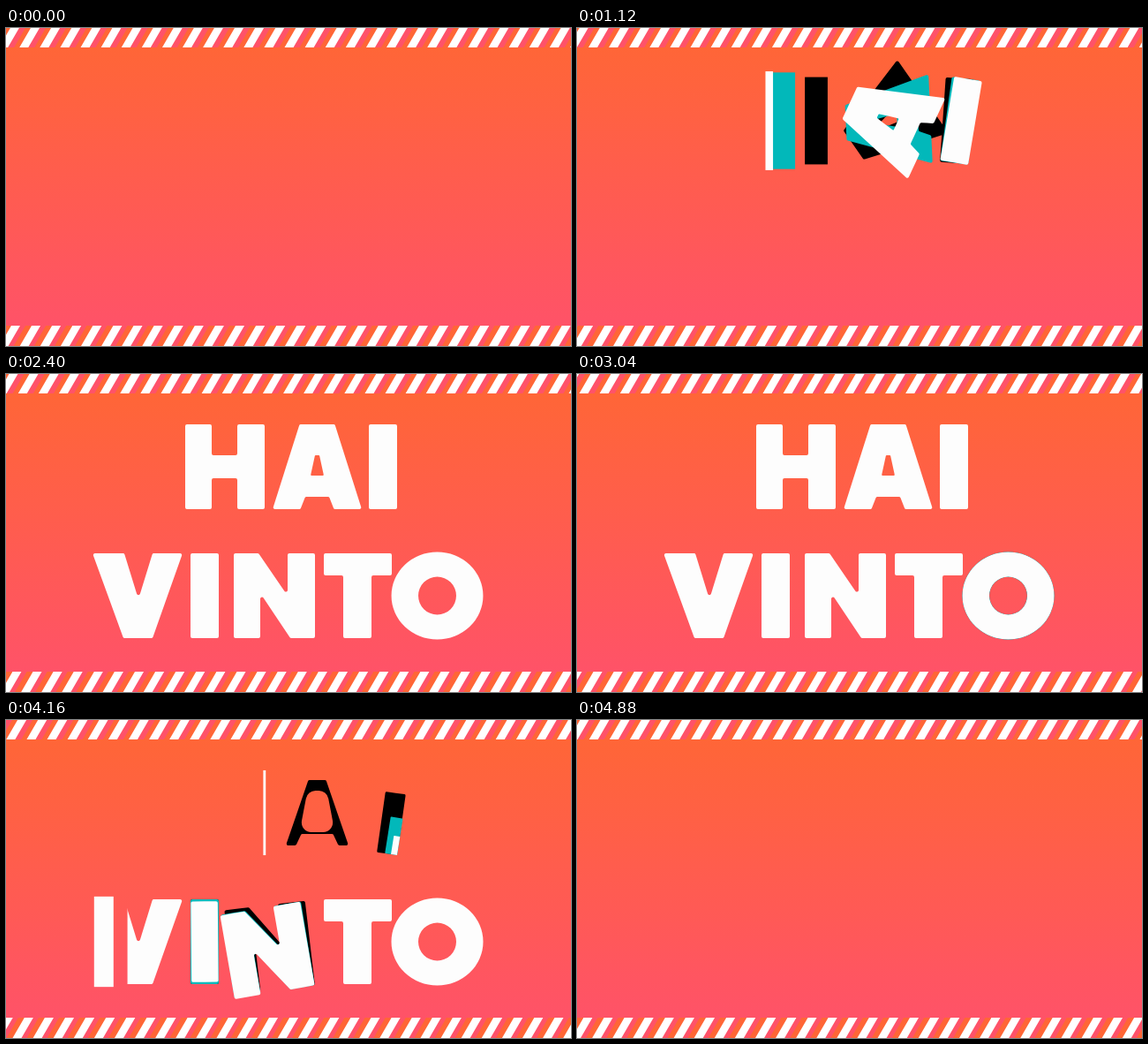
Animation of 640x360 px, one loop 4.96 s. Source, as an HTML page with a canvas:

```html
<!DOCTYPE html>
<html lang="it">
<head>
<meta charset="utf-8">
<title>Hai vinto</title>
<style>
  html, body { margin: 0; width: 100%; height: 100%; overflow: hidden; background: #ff5c50; }
  canvas { display: block; width: 640px; height: 360px; }
</style>
</head>
<body>
<canvas id="stage" width="640" height="360" role="img" aria-label="HAI VINTO"></canvas>
<script>
const ctx = document.getElementById('stage').getContext('2d');
const LOOP = 4960, STEP = 80, MIDDLE = 3000;
const ORANGE = '#ff6636', PINK = '#ff5269';
// Back to front: each layer repeats the motion of the white one, a little later.
const LAYERS = [
  { color: '#000', lag: 160 },
  { color: '#02b8ba', lag: 80 },
  { color: '#fdfdfd', lag: 0 }
];

const { sin, cos, exp, abs, sqrt, PI } = Math;
const clamp = v => Math.max(0, Math.min(1, v));
const lerp = (a, b, p) => a + (b - a) * p;
const progress = (t, start, span) => clamp((t - start) / span);
const fadeOut = p => (1 - p) ** 2;
const bump = (p, from, to) => sin(PI * clamp((p - from) / (to - from)));

function addPoly(path, pts, r) {
  const mid = (a, b) => [(a[0] + b[0]) / 2, (a[1] + b[1]) / 2];
  path.moveTo(...mid(pts[pts.length - 1], pts[0]));
  pts.forEach((p, i) => {
    const end = mid(p, pts[(i + 1) % pts.length]);
    path.arcTo(...p, ...end, r);
    path.lineTo(...end);
  });
  path.closePath();
}
function poly(pts, r = 2) {
  const path = new Path2D();
  addPoly(path, pts, r);
  return path;
}
const stem = (x, y) => poly([[x, y], [x + 32, y], [x + 32, y + 96], [x, y + 96]]);

const shapeH = poly([[203, 57], [233, 57], [233, 92], [262, 92], [262, 57], [293, 57],
  [293, 153], [262, 153], [262, 118], [233, 118], [233, 153], [203, 153]]);
const shapeV = poly([[98, 203], [134, 203], [150, 255], [166, 203], [200, 203], [166, 299], [133, 299]]);
const shapeN = poly([[258, 203], [286, 203], [319, 251], [319, 203], [350, 203],
  [350, 299], [322, 299], [288, 248], [288, 299], [258, 299]]);
const shapeT = poly([[360, 203], [437, 203], [437, 228], [414, 228], [414, 299],
  [382, 299], [382, 228], [360, 228]]);
const shapeO = new Path2D();
shapeO.ellipse(488.5, 251, 52, 49.5, 0, 0, 2 * PI);
shapeO.moveTo(510, 251);
shapeO.arc(488.5, 251, 21.5, 0, 2 * PI);

// The A can thin out: half-widths and heights blend from bold to light around its axis.
function shapeA(thin) {
  const mix = (bold, light) => lerp(bold, light, thin);
  const mirror = half => [...half.map(([x, y]) => [352.5 + x, y]),
    ...half.reverse().map(([x, y]) => [352.5 - x, y])];
  const foot = mix(153, 142);
  const path = poly(mirror([[mix(20, 10), mix(57, 68)], [mix(50.5, 35.5), foot],
    [mix(19, 24), foot], [mix(13.5, 18), mix(139, 129)]]));
  addPoly(path, mirror([[mix(2.5, 11), mix(92, 80)], [mix(7.5, 20), mix(115, 127)]]), mix(1, 11));
  return path;
}

const swing = deg => ({ deg, dx: .8 * deg, dy: abs(deg) });

// Each letter enters and leaves by a rule of its own progress p.
const letters = [
  { shape: shapeA, pivot: [352.5, 105], enterAt: 845, enterFor: 690, leaveAt: 3760, leaveFor: 300,
    enter: p => ({ scale: clamp(p * 6), deg: -180 * fadeOut(p) }),
    leave: p => ({ scale: clamp((1 - p) * 5), thin: clamp(p / .8) }) },
  { shape: stem(411, 57), pivot: [443, 153], enterAt: 900, enterFor: 440, leaveAt: 3937, leaveFor: 421,
    enter: p => ({ scale: clamp(p * 8), deg: 9.5 * sin(PI * p), dy: 2 * sin(PI * p) }),
    leave: p => ({ scale: fadeOut(p), deg: 9 * clamp(p * 6) }) },
  { shape: stem(209, 203), pivot: [225, 251], enterAt: 1480, enterFor: 520, leaveAt: 4150, leaveFor: 400,
    enter: p => ({ scale: clamp(p * 5), deg: -24 * fadeOut(p),
      sx: 1 - .5 * bump(p, .4, .7), sy: 1 - .15 * bump(p, .4, .7) }),
    leave: p => ({ scale: fadeOut(p), deg: -20 * p }) },
  { shape: shapeN, pivot: [304, 251], enterAt: 1460, enterFor: 560, leaveAt: 3880, leaveFor: 640,
    enter: p => ({ scale: clamp(p * 5), ...swing(9 * sin(PI * p)) }),
    leave: p => ({ scale: 1 - clamp((p - .45) / .55) ** 2, ...swing(-10 * sin(1.25 * PI * p)) }) },
  { shape: shapeT, pivot: [398.5, 251], enterAt: 1690, enterFor: 300, leaveAt: 4220, leaveFor: 380,
    enter: p => ({ scale: clamp(p * 9), deg: -120 * fadeOut(p), dx: 15 * (1 - p),
      sx: lerp(.84, 1, p), sy: lerp(.5, 1, p) }),
    leave: p => ({ scale: 1 - p * p, deg: -120 * p * p }) },
  { shape: shapeO, pivot: [488.5, 251], enterAt: 1520, enterFor: 480, leaveAt: 4290, leaveFor: 320,
    enter: p => ({ scale: 1 - exp(-7.6 * p) * cos(6 * PI * p) }),
    leave: p => ({ scale: 1 - p * p }) }
];

function poseAt(letter, t) {
  const pose = t < MIDDLE
    ? letter.enter(progress(t, letter.enterAt, letter.enterFor))
    : letter.leave(progress(t, letter.leaveAt, letter.leaveFor));
  const { scale, deg = 0, dx = 0, dy = 0, sx = 1, sy = 1, thin = 0 } = pose;
  return [scale * sx, scale * sy, deg, dx, dy, thin].map(v => Math.round(v * 1000) / 1000);
}

function drawLetter(letter, t, lag) {
  const pose = poseAt(letter, t - lag);
  if (pose[0] < .01 || (lag && String(pose) === String(poseAt(letter, t)))) return;
  const [sx, sy, deg, dx, dy, thin] = pose;
  const { shape, pivot: [px, py] } = letter;
  ctx.save();
  ctx.translate(px + dx, py + dy);
  ctx.rotate(deg * PI / 180);
  ctx.scale(sx, sy);
  ctx.translate(-px, -py);
  ctx.fill(shape === shapeA ? shapeA(thin) : shape, 'evenodd');
  ctx.restore();
}

// Letters uncovered by a bar that crosses over from "near" to "far" and back, then wiped left to right.
const wipes = [
  { shape: shapeH, y: 105, near: 293, far: 213, enterAt: 928, enterFor: 630, leaveAt: 3681 },
  { shape: shapeV, y: 251, near: 98, far: 197, enterAt: 1587, enterFor: 300, leaveAt: 4098 }
];

function drawBar(x, y, w, h) {
  ctx.fillRect(x - w / 2, y - h / 2, w, h);
}
function fillBetween(shape, from, to) {
  ctx.save();
  ctx.beginPath();
  ctx.rect(from, 0, to - from, 360);
  ctx.clip();
  ctx.fill(shape);
  ctx.restore();
}

function drawWipe({ shape, y, near, far, enterAt, enterFor, leaveAt }, t, lag) {
  if (t < MIDDLE) {
    const p = progress(t - lag, enterAt, enterFor);
    const q = .5 + .5 * (2 * p - 1) ** 3;
    if (p === 1) return lag || ctx.fill(shape);
    if (p === 0) return;
    const x = lerp(far, near, abs(1 - 2 * q));
    const w = 3 + 30 * abs(sin(2 * PI * q));
    drawBar(x, y, w, 96 + 16 * sin(PI * q) ** 2);
    if (lag || q < .45) return;
    const reach = w / 2 + 7 + .4 * w;
    if (near > far) fillBetween(shape, 0, x - reach);
    else fillBetween(shape, x + reach, 640);
  } else if (!lag) {
    const p = progress(t, leaveAt, 480);
    if (p === 0) return ctx.fill(shape);
    const [left, right] = near < far ? [near, far] : [far - 10, near];
    const x = lerp(left, right, p);
    const w = 35 * sqrt(abs(sin(PI * p)));
    if (p < 1) drawBar(x, y, w, 96 + 16 * sin(PI * p));
    fillBetween(shape, Math.min(640, x + w / 2 + 7 + .4 * w), 640);
  }
}

// A short stroke that races around the T.
function drawArc(t, color) {
  const p = progress(t, 1560, 240);
  const strength = sin(PI * p);
  if (strength < .01) return;
  const middle = 40 + 270 * p * p, half = 27 * strength;
  ctx.strokeStyle = color;
  ctx.lineWidth = 3 * strength;
  ctx.beginPath();
  ctx.arc(390, 250, 48 + 12 * p, (middle - half) * PI / 180, (middle + half) * PI / 180);
  ctx.stroke();
}

function gradient(top, bottom) {
  const g = ctx.createLinearGradient(0, 15, 0, 345);
  g.addColorStop(0, top);
  g.addColorStop(1, bottom);
  return g;
}
const sky = gradient(ORANGE, PINK);

// Slanted stripes along the top edge: white, then pink, then the sky showing through.
function drawBand(height, offset, accent) {
  const pitch = 23.1, lean = height * .58;
  const stripes = (shift, width, color) => {
    ctx.fillStyle = color;
    ctx.beginPath();
    for (let x = offset % pitch - pitch + shift; x < 680; x += pitch) {
      ctx.moveTo(x, 0);
      ctx.lineTo(x + width, 0);
      ctx.lineTo(x + width - lean, height);
      ctx.lineTo(x - lean, height);
    }
    ctx.fill();
  };
  stripes(9, 8, accent);
  stripes(0, 10, '#fff');
}

function draw(t) {
  ctx.fillStyle = sky;
  ctx.fillRect(0, 0, 640, 360);
  for (const { color, lag } of LAYERS) {
    ctx.fillStyle = color;
    wipes.forEach(w => drawWipe(w, t, lag));
    drawArc(t - lag, color);
    letters.forEach(l => drawLetter(l, t, lag));
  }
  const slide = 4 * 23.1 * t / LOOP;
  drawBand(22, 4.9 + slide, PINK);
  ctx.save();
  ctx.translate(640, 360);
  ctx.rotate(PI);
  drawBand(23, 13.7 + slide, ORANGE);
  ctx.restore();
}

const start = performance.now();
function tick() {
  const t = (performance.now() - start) % LOOP;
  draw(Math.floor(t / STEP) * STEP);
  requestAnimationFrame(tick);
}
tick();
</script>
</body>
</html>
```
